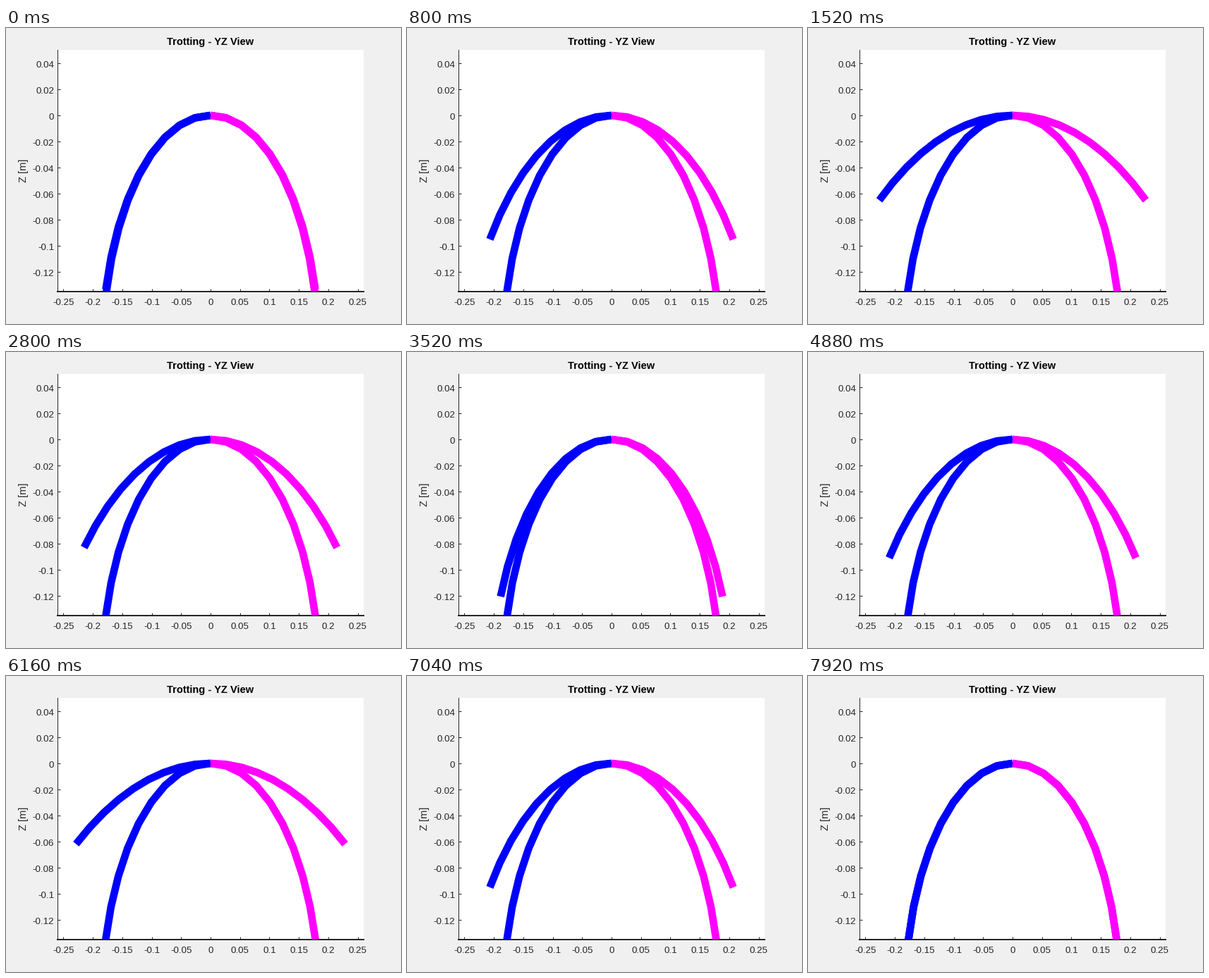
A matplotlib script that plays this animation: 560x420 px, repeating every 8000 ms.

```python
import numpy as np
import matplotlib.pyplot as plt
from matplotlib.animation import FuncAnimation

W, H, DPI = 560, 420, 100
FRAMES, STEP_MS = 100, 80
LEFT, RIGHT, TOP, BOTTOM = 73, 507, 31.4, 373.8
Y_LIM, Z_LIM = (-0.26, 0.26), (-0.135, 0.05)
GREY = "#262626"

LENGTH = 0.24      # arc length of a limb
GROUND = 0.135     # depth of the foot in stance
LIFT = 0.075       # foot clearance at mid swing
REACH = 0.042      # widest fore-aft offset of the foot
SWING_MID = 24     # frame of mid swing
HALF = FRAMES / 4  # half the duration of a swing

plt.rcParams["font.family"] = "Liberation Sans"


def pt(px):
    return px * 72 / DPI


# Bend angle as a function of tip deflection for a constant-curvature limb.
ANGLES = np.linspace(0.01, 1.6, 800)
DEFLECTION = LENGTH * (1 - np.cos(ANGLES)) / ANGLES


def sway(d):
    return REACH * np.sin(np.pi * d / 29)


def foot(frame):
    """Fore-aft offset and depth of the foot."""
    d = (frame - SWING_MID + HALF) % FRAMES - HALF
    if d <= HALF:
        rise = max(np.cos(np.pi * d / (2 * HALF)), 0) ** 1.4
        return sway(d), GROUND - LIFT * rise
    return sway(HALF) * (2 - d / HALF), GROUND


def limb(x, depth):
    """Side projection of a limb bent so that its tip meets the foot."""
    reach = np.hypot(x, depth)
    bend = np.interp(reach, DEFLECTION, ANGLES)
    s = np.linspace(0, bend, 10)
    radius = LENGTH / bend
    return radius * np.sin(s), -radius * (1 - np.cos(s)) * depth / reach


fig = plt.figure(figsize=(W / DPI, H / DPI), dpi=DPI, facecolor="#f0f0f0")
ax = fig.add_axes([LEFT / W, 1 - BOTTOM / H, (RIGHT - LEFT) / W, (BOTTOM - TOP) / H])
ax.set(xlim=Y_LIM, ylim=Z_LIM, facecolor="white")
ax.spines[["top", "right"]].set_visible(False)
for side, width in (("left", 1), ("bottom", 2)):
    ax.spines[side].set(color=GREY, linewidth=pt(width), zorder=1)
ax.set_axisbelow(True)

y_ticks = np.arange(-5, 6) * 0.05
z_ticks = np.arange(-6, 3) * 0.02
ax.set_xticks(y_ticks)
ax.set_yticks(z_ticks)
ax.tick_params(direction="in", length=pt(4.4), width=pt(1), color=GREY,
               labelbottom=False, labelleft=False)


def note(x, y, text, size=13.33, **style):
    style = {"color": GREY, "ha": "center", "va": "baseline", **style}
    fig.text(x / W, 1 - y / H, text, fontsize=pt(size), **style)


for v in y_ticks:
    px = LEFT + (v - Y_LIM[0]) / (Y_LIM[1] - Y_LIM[0]) * (RIGHT - LEFT)
    note(px, 393, f"{v:.2g}")
for v in z_ticks:
    py = BOTTOM - (v - Z_LIM[0]) / (Z_LIM[1] - Z_LIM[0]) * (BOTTOM - TOP)
    note(68, py + 6, f"{v:.2g}", ha="right")
note(290, 24, "Trotting - YZ View", 14.67, color="black", weight="bold")
note(29, 202.5, "Z [m]", 14.67, rotation=90, rotation_mode="anchor")


def limb_line(color):
    return ax.plot([], [], color=color, lw=pt(10.67), zorder=3,
                   solid_capstyle="butt", solid_joinstyle="round")[0]


pairs = [(limb_line("#0000ff"), limb_line("#ff00ff")) for _ in range(2)]


def draw(i):
    for (left, right), shift in zip(pairs, (0, FRAMES // 2)):
        y, z = limb(*foot(i + shift))
        left.set_data(-y, z)
        right.set_data(y, z)
    return [line for pair in pairs for line in pair]


anim = FuncAnimation(fig, draw, frames=FRAMES, interval=STEP_MS,
                     repeat=True, repeat_delay=0)
plt.show()
```
